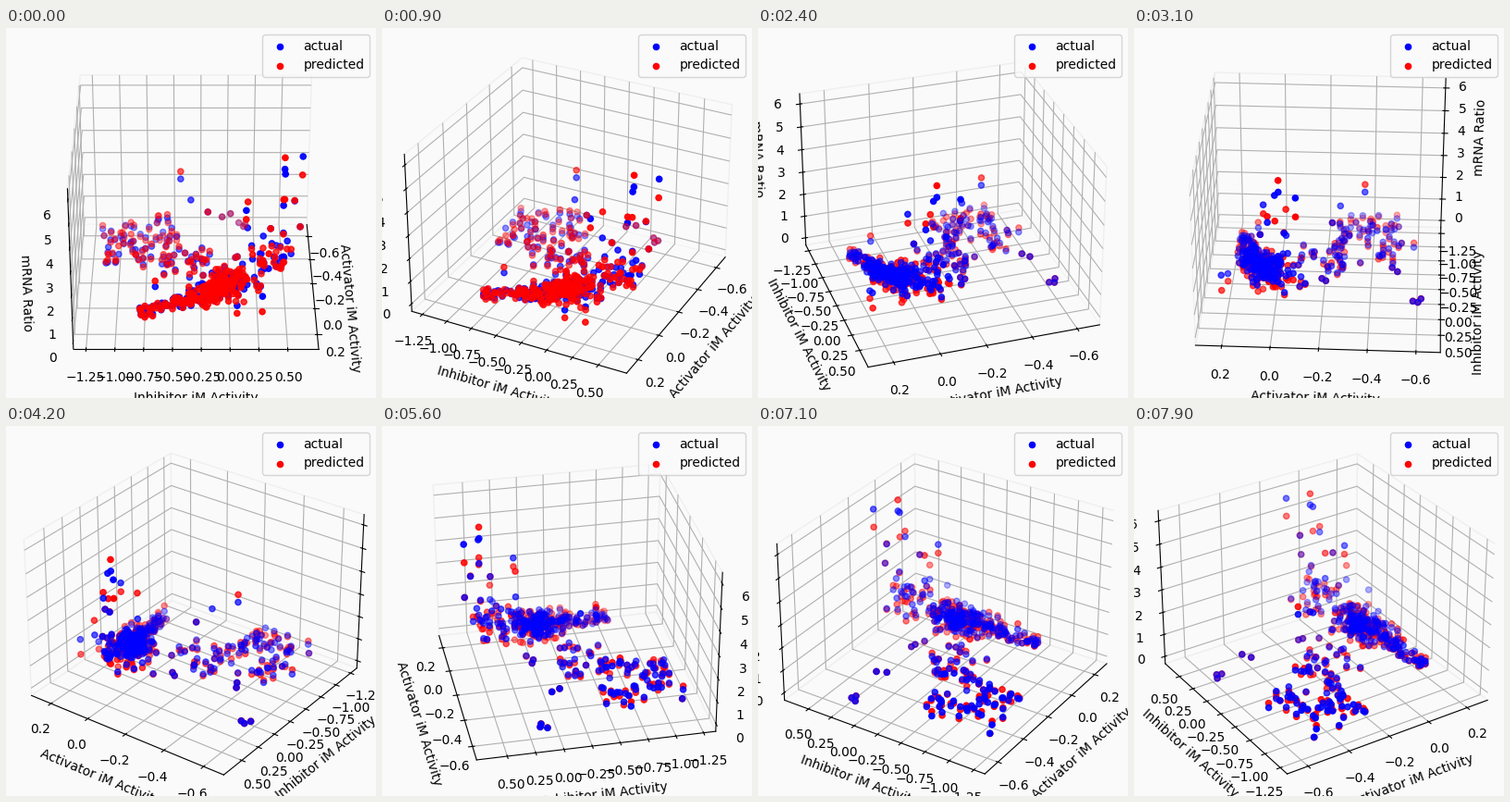
A matplotlib script that plays this animation: 400 by 400 pixels, repeating every 8 s.

```python
import numpy as np
import matplotlib.pyplot as plt
from matplotlib.animation import FuncAnimation

BG, EDGE = "#fafafa", "#efefef"
STEP, FRAMES = 3, 80

rng = np.random.default_rng(7)

# Isolated samples: activator, inhibitor, actual ratio, predicted ratio
singles = np.array([
    (-.031, .473, 5.55, 6.03), (-.016, .477, 5.42, 4.35),
    (.015, .464, 4.25, 4.50), (-.105, .636, 5.72, 4.94),
    (.044, .140, 4.19, 3.81), (-.050, .159, 2.95, 4.07),
    (-.056, .568, 4.08, 4.10), (.050, .353, 3.45, 3.45),
    (-.035, .620, 3.08, 3.08), (-.027, .473, 2.85, 2.80),
    (-.027, .509, 2.50, 2.15), (-.027, .545, 1.94, 2.14),
    (.219, .280, 1.45, .78), (.202, .062, .95, .61),
    (-.582, .153, .19, .20), (-.603, .169, .19, .19),
    (-.616, .110, .19, .20), (-.514, .026, 1.15, 1.15),
    (-.491, -.053, 1.12, 1.12), (-.234, -.189, 2.68, 2.68),
    (-.367, -.435, 3.46, 3.79), (-.265, -.342, 3.05, .30),
    (.100, -.654, 1.20, 1.45), (-.196, .062, .85, .85),
    (-.213, .080, .80, .80), (-.103, .090, .55, .52),
    (-.580, -.654, .50, .70), (-.400, -.640, 1.50, 1.65),
    (-.420, -.560, 1.45, 1.60), (-.380, -.520, 1.20, 1.05),
])


def group(x, y, z, err):
    """Stack samples whose prediction misses by a normal error."""
    pred = z + rng.normal(0, err, len(z))
    return np.column_stack([x, y, np.maximum(z, .05), np.maximum(pred, .05)])


def ridge(y, spread):
    return .058 - .142 * y + rng.normal(0, spread, len(y))


y_core = np.clip(rng.normal(-.06, .14, 150), -.45, .3)
y_tail = rng.uniform(-.8, -.3, 40)
core = group(ridge(y_core, .042), y_core,
             1.1 + .8 * y_core + rng.normal(0, .2, 150), .2)
tail = group(ridge(y_tail, .02), y_tail,
             1.05 + .8 * y_tail + rng.normal(0, .08, 40), .08)
rise = group(rng.normal(-.02, .06, 24), rng.uniform(.15, .48, 24),
             rng.normal(1.8, .45, 24), .25)
mid = group(rng.uniform(-.28, -.08, 24), rng.uniform(-.6, -.15, 24),
            rng.uniform(.3, 1.0, 24), .12)
far = group(rng.uniform(-.53, -.24, 48), rng.uniform(-1.18, -.47, 48),
            rng.uniform(.1, .85, 48), .15)
x, y, actual, predicted = np.vstack([singles, core, tail, rise, mid, far]).T

fig = plt.figure(figsize=(4, 4), dpi=100, facecolor=BG)
ax = fig.add_axes((0, 0, 1, 1), projection="3d", facecolor=BG,
                  computed_zorder=False)
blue = ax.scatter(x, y, actual, c="blue", label="actual")
red = ax.scatter(x, y, predicted, c="red", label="predicted")

ax.set(xlim=(-.700, .308), ylim=(-1.360, .768), zlim=(-.337, 6.443),
       xticks=np.arange(-3, 2) / 5, yticks=np.arange(-5, 3) / 4,
       zticks=range(7), xlabel="Activator iM Activity",
       ylabel="Inhibitor iM Activity", zlabel="mRNA Ratio")
for axis in (ax.xaxis, ax.yaxis, ax.zaxis):
    axis.pane.set(facecolor=BG, edgecolor=EDGE, alpha=1)
ax.legend(loc="upper right", facecolor=BG)


def draw(i):
    azim = STEP * i
    ax.view_init(elev=30, azim=azim)
    # The set holding the sample nearest the viewer goes on top
    red.set_zorder(3 if azim < 54 else 1)
    blue.set_zorder(2)
    return blue, red


anim = FuncAnimation(fig, draw, frames=FRAMES, interval=100,
                     repeat=True, repeat_delay=0)
plt.show()
```
